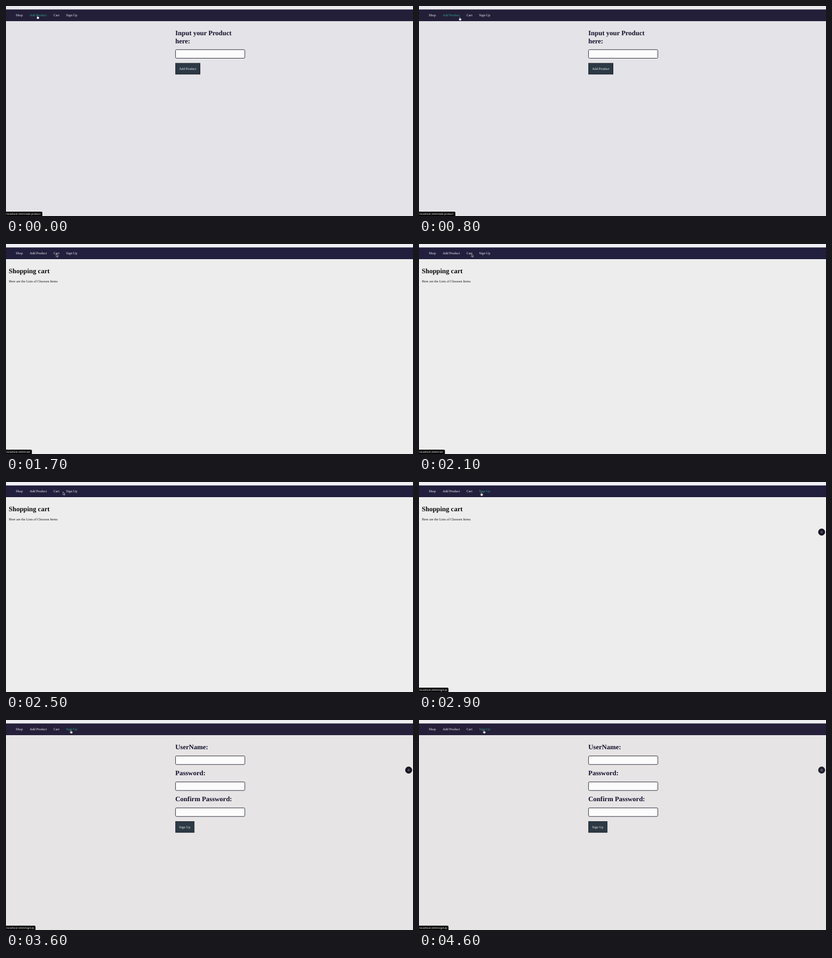
These frames come from a looping animation (750 by 388 pixels, 6.2 s). An HTML page:

```html
<!DOCTYPE html>
<html lang="en">
<head>
<meta charset="utf-8">
<title>Shop pages</title>
<style>
html, body { margin: 0; width: 100%; height: 100%; overflow: hidden; background: #e4e3e7; }
svg { display: block; width: 750px; height: 388px; text-rendering: geometricPrecision; }
text { font: 6.25px "Liberation Serif", "Times New Roman", serif; }
.title text { font-weight: bold; font-size: 12.5px; fill: #11102a; }
.nav text { fill: #f3f2f6; }
.status text { font: 5.18px "Liberation Sans", Arial, sans-serif; fill: #f4f4f4; }
.field { fill: #fcfcfd; stroke: #33343d; stroke-width: 1; }
.label { fill: #eceef0; }

/* one loop is 62 ticks of 100 ms */
.t { animation: 6200ms step-end infinite; }
.page1 { animation-name: page1; }
.page2 { animation-name: page2; }
.page3 { animation-name: page3; }
.add { animation-name: add; }
.cart { animation-name: cart; }
.sign { animation-name: sign; }
.s-add { animation-name: s-add; }
.s-cart { animation-name: s-cart; }
.s-sign { animation-name: s-sign; }
.badge { animation-name: badge; }
.hand { animation-name: hand; }
.arrow { animation-name: arrow; }
.cursor { animation-name: move; }

@keyframes page1 { 0% { opacity: 1 } 27.41%, 100% { opacity: 0 } }
@keyframes page2 { 0% { opacity: 0 } 27.41% { opacity: 1 } 58.06%, 100% { opacity: 0 } }
@keyframes page3 { 0% { opacity: 0 } 58.06%, 100% { opacity: 1 } }
@keyframes add { 0% { fill: #2fa589 } 14.51%, 100% { fill: #f3f2f6 } }
@keyframes cart { 0% { fill: #f3f2f6 } 17.74% { fill: #2fa589 } 27.41%, 100% { fill: #f3f2f6 } }
@keyframes sign { 0% { fill: #f3f2f6 } 45.16%, 100% { fill: #2fa589 } }
@keyframes s-add { 0% { opacity: 1 } 17.74%, 100% { opacity: 0 } }
@keyframes s-cart { 0% { opacity: 0 } 17.74% { opacity: 1 } 35.48% { opacity: .5 } 37.09%, 100% { opacity: 0 } }
@keyframes s-sign { 0% { opacity: 0 } 46.77%, 100% { opacity: 1 } }
@keyframes badge {
  0% { opacity: 0 } 17.74% { opacity: 1 } 27.41% { opacity: 0 }
  46.77% { opacity: 1 } 72.58% { opacity: .97 } 74.19%, 100% { opacity: .94 }
}
@keyframes hand {
  0% { opacity: 1 } 14.51% { opacity: 0 } 17.74% { opacity: 1 }
  27.41% { opacity: 0 } 45.16%, 100% { opacity: 1 }
}
@keyframes arrow {
  0% { opacity: 0 } 14.51% { opacity: 1 } 17.74% { opacity: 0 }
  27.41% { opacity: 1 } 45.16%, 100% { opacity: 0 }
}
@keyframes move {
  0% { transform: translate(58px, 17px) }
  6.45% { transform: translate(59px, 17px) }
  8.06% { transform: translate(59px, 17px); animation-timing-function: steps(3) }
  12.9% { transform: translate(75px, 20px); animation-timing-function: steps(4) }
  19.35% { transform: translate(91.5px, 17.5px) }
  27.41% { transform: translate(92.5px, 18px) }
  30.64% { transform: translate(92.5px, 18px); animation-timing-function: steps(6) }
  40.32% { transform: translate(105px, 18px); animation-timing-function: steps(6) }
  50% { transform: translate(119.5px, 19px) }
  58.06%, 100% { transform: translate(119.5px, 18px) }
}
</style>
</head>
<body>
<svg viewBox="0 0 750 388">
  <defs>
    <rect id="field" class="field" x="312.4" y=".7" width="127.7" height="15.8" rx="2"/>
  </defs>

  <g class="t page1">
    <rect width="750" height="388" fill="#e4e3e7"/>
    <rect width="750" height="6.4" fill="#e9e8ee"/>
    <rect y="6.4" width="750" height="21.6" fill="#231f39"/>
    <g class="title">
      <text x="312" y="54">Input your Product</text>
      <text x="312" y="68.5">here:</text>
    </g>
    <use href="#field" y="80"/>
    <rect x="312" y="105.4" width="46" height="21" fill="#14191f"/>
    <rect x="312.4" y="105.8" width="44.6" height="19.6" fill="#2d3944"/>
    <text class="label" x="319" y="117.8">Add Product</text>
  </g>

  <g class="t page2">
    <rect width="750" height="388" fill="#ededed"/>
    <rect width="750" height="6.4" fill="#f0f1f8"/>
    <rect y="6.4" width="750" height="21.6" fill="#211f3d"/>
    <g class="title"><text x="5" y="54" style="fill:#0b0b0d">Shopping cart</text></g>
    <text x="5.2" y="71.2" fill="#111">Here are the Lists of Choosen Items</text>
  </g>

  <g class="t page3">
    <rect width="750" height="388" fill="#e6e4e5"/>
    <rect width="750" height="6.4" fill="#eeedf1"/>
    <rect y="6.4" width="750" height="21.6" fill="#251f39"/>
    <g class="title">
      <text x="312" y="54">UserName:</text>
      <text x="312" y="102">Password:</text>
      <text x="312" y="150">Confirm Password:</text>
    </g>
    <use href="#field" y="65.7"/>
    <use href="#field" y="113.7"/>
    <use href="#field" y="161.7"/>
    <rect x="312" y="187" width="35.2" height="21.2" fill="#1c232a"/>
    <rect x="312.4" y="187.4" width="34" height="20" fill="#2d3944"/>
    <text class="label" x="319" y="199.6">Sign Up</text>
  </g>

  <g class="nav">
    <text x="18" y="19">Shop</text>
    <text class="t add" x="43.4" y="19">Add Product</text>
    <text class="t cart" x="87.4" y="19">Cart</text>
    <text class="t sign" x="110.8" y="19">Sign Up</text>
  </g>

  <g class="t badge">
    <circle cx="742" cy="92.5" r="6.4" fill="#161522"/>
    <circle cx="742" cy="92.5" r="2.2" fill="#4b4a60"/>
  </g>

  <g class="status">
    <g class="t s-add">
      <path d="M0 380H65q2 0 2 2V388H0z"/>
      <text x="1" y="386">localhost:3000/add-product</text>
    </g>
    <g class="t s-cart">
      <path d="M0 380H45.7q2 0 2 2V388H0z"/>
      <text x="1" y="386">localhost:3000/cart</text>
    </g>
    <g class="t s-sign">
      <path d="M0 380H52.3q2 0 2 2V388H0z"/>
      <text x="1" y="386">localhost:3000/signUp</text>
    </g>
  </g>

  <g class="t cursor">
    <path class="t hand" d="M-.7 .7Q0-.2 .6 .7V2.7L2.7 3.2Q3.4 3.5 3.2 4.6L2.5 7H-.4L-2 4.4Q-1.8 3.5-.7 4.2z" fill="#fff" stroke="#17152a" stroke-width=".5"/>
    <path class="t arrow" d="M0 0V5.6L1.3 4.5L2.2 6.5L3.2 6L2.3 4.1H4z" fill="#15141f" stroke="#e6e6ec" stroke-width=".6"/>
  </g>
</svg>
</body>
</html>
```
